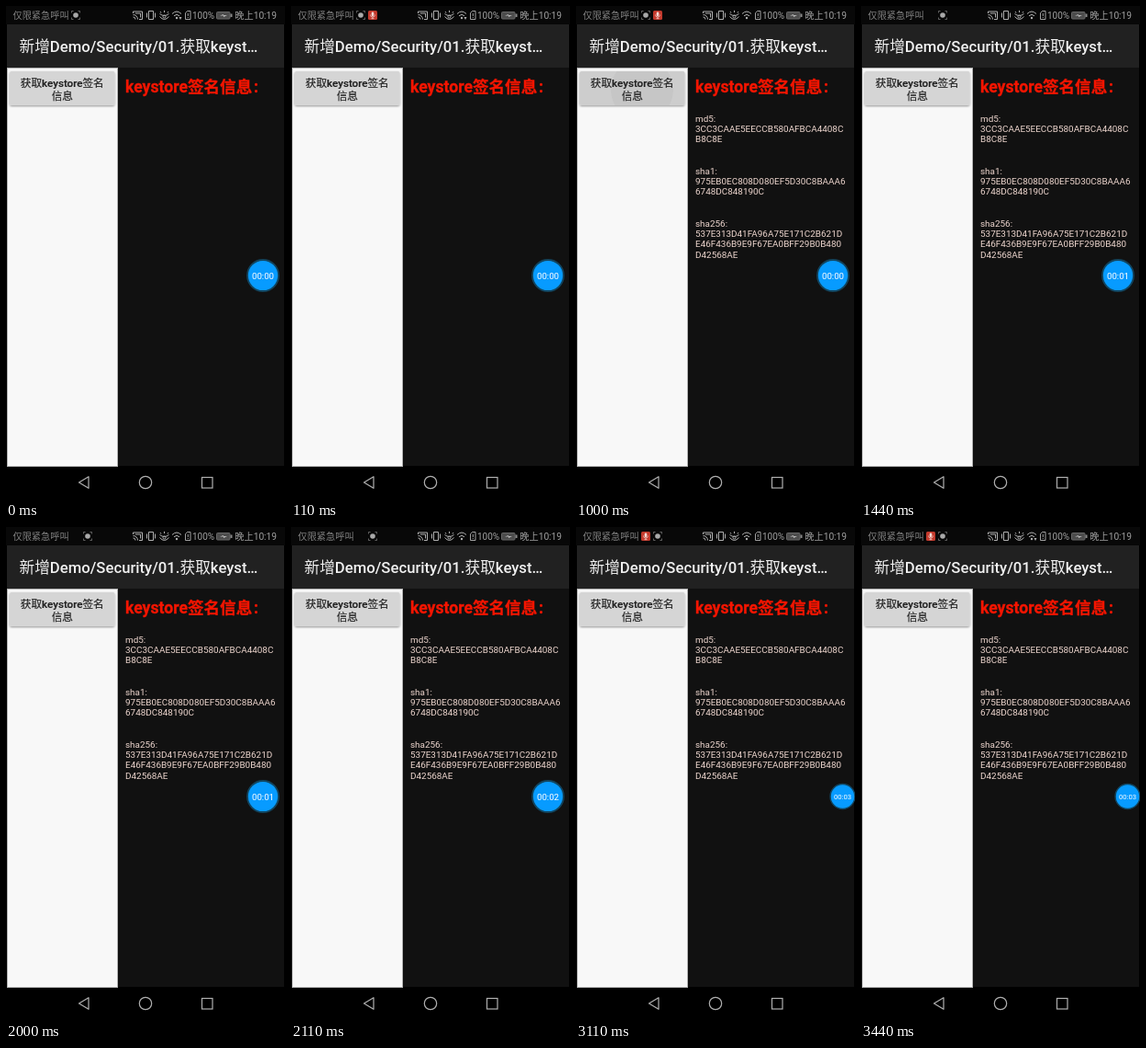
Animation, 304 px wide and 536 px high, one loop 4110 ms. Source, as an HTML page:

```html
<!DOCTYPE html>
<html lang="zh-CN">
<head>
<meta charset="utf-8">
<title>Keystore demo</title>
<style>
  html, body { margin: 0; width: 100%; height: 100%; overflow: hidden; background: #000; }
  svg { display: block; width: 100%; height: 100%; }
  text { font-family: Roboto, 'Noto Sans CJK SC', 'Noto Sans CJK', sans-serif; white-space: pre; }
  .middle { text-anchor: middle; }
  .status { font-size: 10.2px; fill: #a0a0a0; }
  .line { fill: none; stroke: #b0b0b0; }
  .hash { font-size: 9.92px; fill: #f0d8d0; }
</style>
</head>
<body>
<svg viewBox="0 0 304 536">
  <defs>
    <clipPath id="buttonClip"><rect x="4" y="71" width="114.5" height="37" rx="2"/></clipPath>
    <filter id="shadow" x="-10%" y="-20%" width="120%" height="150%">
      <feDropShadow dx="0" dy="1" stdDeviation="0.8" flood-opacity=".4"/>
    </filter>
  </defs>

  <!-- Panels -->
  <rect width="304" height="536" fill="#000"/>
  <rect width="304" height="20" fill="#080808"/>
  <rect x="1" y="20" width="302" height="47" fill="#212121"/>
  <rect x="122" y="67" width="181" height="433" fill="#111"/>
  <rect x="1.5" y="67.5" width="120" height="433" fill="#f8f8f8" stroke="#b4b4b4"/>

  <!-- Status bar -->
  <text class="status" x="7.5" y="14" fill-opacity=".8">仅限紧急呼叫</text>
  <g id="record">
    <path d="M-4.5-2.5v-2h2M2.5-4.5h2v2M4.5 2.5v2h-2M-2.5 4.5h-2v-2" fill="none" stroke="#777" stroke-width=".8"/>
    <circle r="2.8" fill="#aaa"/>
  </g>
  <g id="mic">
    <rect x="-5" y="-5" width="10" height="10" rx="1.5" fill="#c33a2d"/>
    <rect x="-1.3" y="-3.5" width="2.6" height="4.5" rx="1.3" fill="#f3dcd8"/>
    <path d="M-2.5-.5a2.5 2.5 0 0 0 5 0M0 2v1.7M-1.5 3.7h3" fill="none" stroke="#f3dcd8" stroke-width=".7"/>
  </g>
  <g class="line">
    <path d="M138.5 8V6h10v8.5H145M138.5 9.5a5 5 0 0 1 5 5M138.5 12a2.500 2.500 0 0 1 2.500 2.500M141 8h5.500v4.500"/>
    <path d="M155.500 5.500h5v9h-5zM153.500 7.500v5M162.500 7.500v5"/>
    <path d="M167.500 8.500q5 4 10 0M167.500 11.500q5 6 10 0M172.500 7V4.800M169 7.500l-1-1.500M176 7.500l1-1.500"/>
    <circle cx="172.500" cy="11.500" r="1.500"/>
    <path d="M181 8.500q5-5 10 0M183 10.800q3-3 6 0"/>
    <path d="M195.500 7.500l2-2h3.500v9h-5.500zM198.300 8v3M198.300 12v1" stroke-width=".9"/>
  </g>
  <circle cx="186" cy="13" r="1.200" fill="#b0b0b0"/>
  <path id="traffic" d="M188.500 12h3l-1.500 3z" fill="#b0b0b0"/>
  <text class="status" x="203" y="14" style="font-size:10px">100%</text>
  <rect x="229.500" y="6.500" width="14.500" height="7.500" rx="1" fill="#4c4c4c" stroke="#666"/>
  <rect x="244.500" y="8.500" width="2" height="3.500" fill="#888"/>
  <path d="M233 10.500l4-1.500v1h4l-4 2v-1.500z" fill="#bbb"/>
  <text class="status" x="249.300" y="14">晚上10:19</text>

  <!-- Toolbar and button -->
  <text x="14.500" y="50" font-size="16.700" font-weight="500" fill="#f0f0f0">新增Demo/Security/01.获取keyst…</text>
  <rect x="4" y="71" width="114.500" height="37" rx="2" fill="#d5d5d5" filter="url(#shadow)"/>
  <g id="ripple" clip-path="url(#buttonClip)">
    <rect x="4" y="71" width="115" height="38" fill-opacity=".5"/>
    <circle cx="72" cy="91" r="34"/>
  </g>
  <g class="middle" font-size="11.650" font-weight="500" fill="#202020" stroke="#202020" stroke-width=".2">
    <text x="61.300" y="88">获取keystore签名</text>
    <text x="61.300" y="101.500">信息</text>
  </g>

  <!-- Result -->
  <g font-size="17.600" font-weight="700" fill="#f51500" stroke="#f51500" stroke-width=".3">
    <text x="130" y="94">keystore签名信息</text>
    <text x="270" y="94">:</text>
  </g>
  <g id="hashes"></g>

  <!-- Recorder bubble -->
  <g id="bubble">
    <circle r="17" fill="#079bff" stroke="#12455f" stroke-width="1.800"/>
    <text id="timer" class="middle" y="3.500" font-size="9.700" fill="#fff"></text>
  </g>

  <!-- Navigation -->
  <g class="line" stroke-width="1.200">
    <path d="M79.500 518l10.500-6.300v12.600z" stroke-linejoin="round"/>
    <circle cx="152" cy="518" r="6.700"/>
    <rect x="213.500" y="512.500" width="11.500" height="11.500"/>
  </g>
</svg>
<script>
const LOOP = 4110;
const LINE_HEIGHT = 11.4;
const $ = id => document.getElementById(id);

// Each digest block takes five lines, blank ones included.
const digests = [
  ['md5:', '3CC3CAAE5EECCB580AFBCA4408C', 'B8C8E'],
  ['sha1:', '975EB0EC808D080EF5D30C8BAAA6', '6748DC848190C'],
  ['sha256:', '537E313D41FA96A75E171C2B621D', 'E46F436B9E9F67EA0BFF29B0B480', 'D42568AE'],
];
$('hashes').innerHTML = digests.map((lines, block) => lines.map((line, i) =>
  `<text class="hash" x="130" y="${125.6 + (block * 5 + i) * LINE_HEIGHT}">${line}</text>`).join('')).join('');

const place = (id, x, y, scale = 1) =>
  $(id).setAttribute('transform', `translate(${x} ${y}) scale(${scale})`);
const show = (id, opacity) => $(id).setAttribute('opacity', Number(opacity));

function draw(t) {
  const shifted = t >= 1440;
  place('record', shifted ? 89 : 76, 10);
  place('mic', shifted ? 76 : 89, 10);
  show('mic', (t >= 110 && !shifted) || t >= 3110);
  show('traffic', t < 440 || t >= 3440);

  show('hashes', t >= 1000);
  show('ripple', t < 1000 || t >= 1220 ? 0 : t < 1110 ? 0.07 : 0.035);

  const seconds = Math.floor(Math.max(0, t - 110) / 1000);
  $('timer').textContent = `00:0${seconds}`;
  if (t >= 3110) place('bubble', 290.5, 293, 0.79);
  else place('bubble', 280, 293, t >= 3000 ? 0.96 : 1);
}

const start = performance.now();
function frame() {
  draw((performance.now() - start) % LOOP);
  requestAnimationFrame(frame);
}
frame();
</script>
</body>
</html>
```
